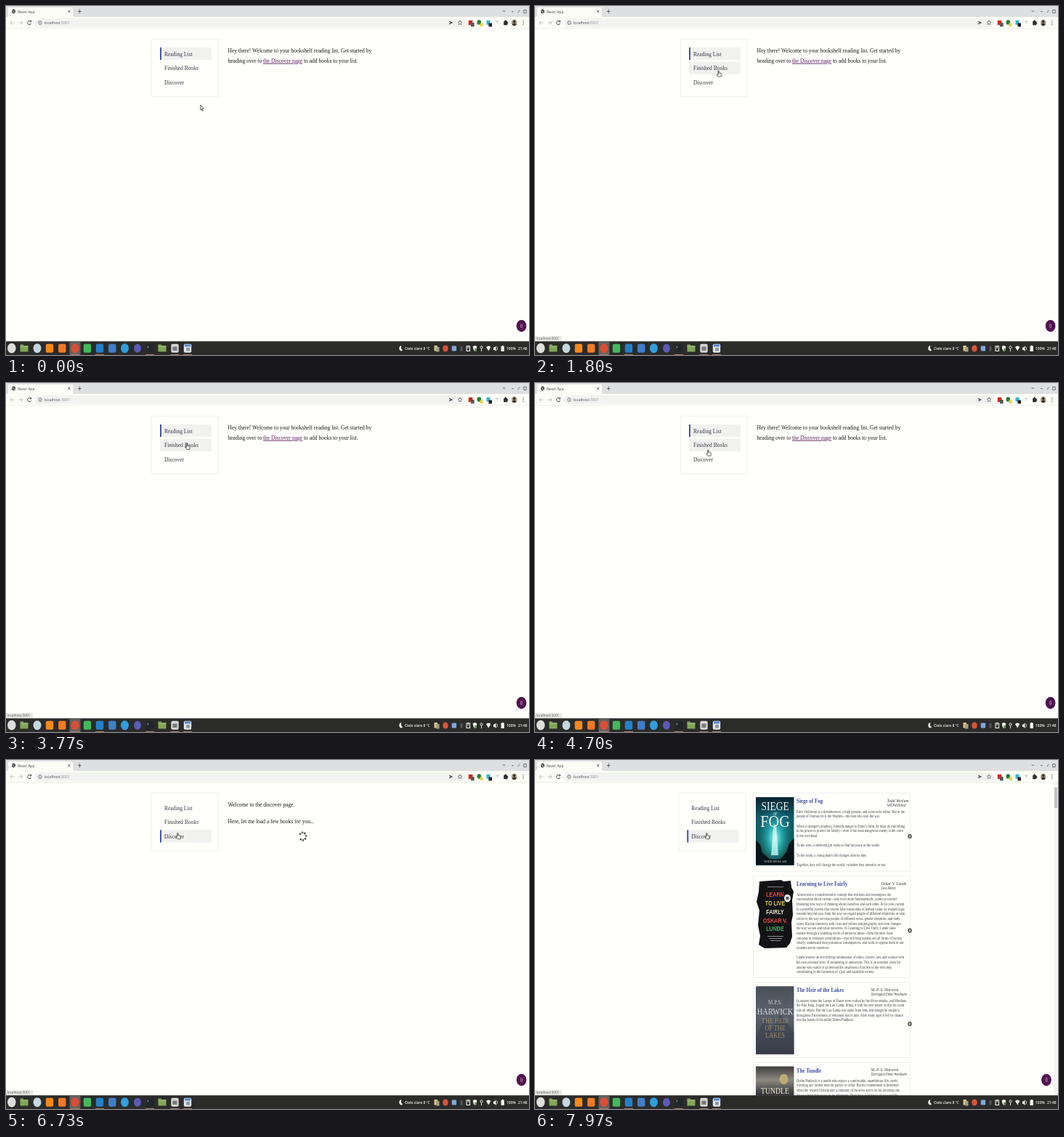
Recreate the animation shown at these times as an HTML page. Size 720x480 px, loop 8 s.

```html
<!DOCTYPE html>
<html lang="en">
<head>
<meta charset="utf-8">
<title>Bookshelf</title>
<style>
html, body { margin: 0; width: 100%; height: 100%; overflow: hidden; background: #fffffb; }
svg { display: block; width: 100vw; height: 100vh; }
text { white-space: pre; }
.ui { font-family: "Open Sans", "Noto Sans", sans-serif; }
.serif { font-family: "Liberation Serif", serif; }
.cursor { animation: point 8s linear infinite; }
.spin { animation: spin 1s linear -.605s infinite; }
.slide { animation: slide 8s step-end infinite; }
.badge { animation: badge 8s step-end infinite; }
@keyframes point {
  0%, 6.5% { transform: translate(267.8px, 136px); }
  11.9%, 18% { transform: translate(260.5px, 103.5px); }
  24% { transform: translate(250px, 84px); }
  34.6%, 54% { transform: translate(249.2px, 83px); }
  58.75% { transform: translate(238.3px, 91.8px); }
  62%, 100% { transform: translate(236.3px, 100.3px); }
}
@keyframes spin { to { transform: rotate(360deg); } }
@keyframes slide { 0% { transform: none; } 88%, 100% { transform: translateX(-2.7px); } }
@keyframes badge { 0% { transform: none; } 88%, 100% { transform: translateX(-5.6px); } }
</style>
</head>
<body>
<svg id="stage" viewBox="0 0 720 480" preserveAspectRatio="none"></svg>
<script>
const LOOP = 8000, HOVER = 872, FINISHED = 1650, DISCOVER = 4800, CLICK = 5400, LOADED = 7050;
const PAGE = '#fffffb', INK = '#343a40', INDIGO = '#3f4ea8', GLOW = '#f1f1f0', BORDER = '#ececee';
const sheet = document.head.appendChild(document.createElement('style'));
let rules = 0;

// The desktop is 1920 x 1080, squeezed onto the 720 x 480 stage.
const SQUEEZE = 'scale(.375 .4444)';
const text = (x, y, size, str, fill, more = '') =>
  `<text transform="translate(${x} ${y}) ${SQUEEZE}" font-size="${size}" fill="${fill}" ${more}>${str}</text>`;
const rect = (x, y, w, h, fill, more = '') =>
  `<rect x="${x}" y="${y}" width="${w}" height="${h}" fill="${fill}" ${more}/>`;
const dot = (x, y, r, fill, more = '') =>
  `<ellipse cx="${x}" cy="${y}" rx="${r}" ry="${r * 1.185}" fill="${fill}" ${more}/>`;
const line = (d, stroke, width = .9, more = '') =>
  `<path d="${d}" fill="none" stroke="${stroke}" stroke-width="${width}" ${more}/>`;
const frame = (x, y, w, h) => rect(x, y, w, h, 'none', `stroke="${BORDER}" stroke-width=".8"`);

// Shows the content only inside the given [from, to] spans, in ms.
function during(spans, content) {
  const name = 'show' + rules++;
  const steps = spans.map(([a, b]) =>
    `${a / LOOP * 100}%{visibility:visible}` + (b < LOOP ? `${b / LOOP * 100}%{visibility:hidden}` : ''));
  const start = spans[0][0] ? '0%{visibility:hidden}' : '';
  sheet.textContent += `@keyframes ${name}{${start}${steps.join('')}}`;
  return `<g style="animation:${name} ${LOOP}ms step-end infinite">${content}</g>`;
}

function browserBar() {
  const ink = '#45474a', pale = '#bcbec0';
  return `<g class="ui">` +
    rect(0, 0, 720, 15, '#dedfe0') +
    `<path d="M1 15q2 0 2-3V4q0-2 2-2H90q2 0 2 2v8q0 3 2 3z" fill="#fdfdf8"/>` +
    rect(0, 15, 720, 16, '#fdfdf8') + rect(0, 30.6, 720, .6, '#e4e4e2') +
    rect(40, 17.2, 592, 12, '#f2f3f0', 'rx="5"') +
    dot(10.5, 7.5, 2.5, '#505356') + line('M8.5 6.5l2 1 1.5 2.5', '#e4e6e8', .7) +
    text(16, 10, 13.4, 'React App', ink) +
    line('M85.3 5.7l3 3.6m0-3.6l-3 3.6M99 7.5h4.6m-2.3-2.7v5.4', ink, .8) +
    line('M11.5 23h-5.5m2.3-2.7L6 23l2.3 2.7M17.3 23h5.5m-2.3-2.7l2.3 2.7-2.3 2.7', pale) +
    line('M34 21.2a2.4 2.8 0 1 0 .4 2.8M34.6 19.8v2.2h-2', ink, 1) +
    dot(47, 23, 2.2, 'none', `stroke="${ink}" stroke-width=".6"`) + line('M47 22.5v2M47 21.2v.6', ink, .6) +
    text(53, 25.2, 13.7, `localhost<tspan fill="#85888c">:3001</tspan>`, ink) +
    line('M683.8 6l1.7 2 1.7-2M696 7.7h2.8M704.8 9.2l2.5-3.5M712.8 5.4h3.4v4.2h-3.4z', ink, .7) +
    `<path d="M610 20.5l5.2 2.5-5.2 2.5.6-2 2.2-.5-2.2-.5z" fill="${ink}"/>` +
    `<path d="M625 19.8l.8 2.2h2l-1.6 1.5.6 2.4-1.8-1.4-1.8 1.4.6-2.4-1.6-1.5h2z" fill="none" stroke="${ink}" stroke-width=".6"/>` +
    rect(636.8, 19.8, 5.6, 6.4, '#d0281e') + rect(640, 23, 4.6, 5.4, '#55585a') +
    dot(651.3, 22.5, 2.8, '#2c7a38') + rect(652.5, 23.5, 4, 4.5, '#e2d43c') +
    rect(661.5, 19.7, 5, 6, '#3ab4d4') + rect(664.5, 23.5, 4.5, 5, '#222226') +
    `<path d="M673.5 20h5.5l-2.7 5z" fill="#dcdcda"/>` +
    rect(685.2, 21, 5, 5.3, '#2c2e30') + dot(687.7, 20.6, 1.2, '#2c2e30') + dot(690.3, 23.4, 1, '#2c2e30') +
    dot(699.7, 23, 3.8, '#a89c88') + dot(699.7, 21.5, 1.7, '#3c3028') +
    `<path d="M696.7 25.5q3-4 6 0-3 3.4-6 0z" fill="#3c3028"/>` +
    [20.5, 23, 25.5].map(y => dot(712, y, .6, ink)).join('') + `</g>`;
}

function taskbar() {
  const folder = x => `<path d="M${x - 5.5} 465.5h4l1 1.5h6v8.5h-11z" fill="#82a659"/>` +
    rect(x - 5.5, 468.5, 11, .6, '#b3cc8c');
  const tile = (x, fill) => rect(x - 5.2, 464.7, 10.4, 12, fill, 'rx="2"');
  const tray = '#f2f2f0';
  return `<g class="ui">` + rect(0, 461.3, 720, 18.7, '#2b2b2a') + rect(0, 461.3, 720, .6, '#474746') +
    rect(87.5, 462, 15, 18, '#62625f') +
    dot(7.8, 470.7, 5.8, '#dededc') + folder(25) + dot(43, 470.7, 5.5, '#c4d8e0') +
    tile(60, '#f58a1c') + tile(77.3, '#f07a26') + dot(95, 470.7, 5.5, '#dc4e36') +
    tile(112, '#43b95c') + tile(129, '#2580c8') + tile(146.3, '#3f7fc8') +
    dot(163.5, 470.7, 5.5, '#2f9fdc') + dot(181, 470.7, 5, '#5a5cb6') +
    rect(192.5, 465, 11, 11.5, '#20262a') + line('M194.5 467.5l1.6 1.5-1.6 1.5', tray, .6) +
    folder(215) + tile(232.5, '#d6d6d4') + rect(229.5, 468.5, 6, 5.5, '#7a7a7c') +
    tile(250, '#e4e6e8') + rect(246, 465.5, 8, 3, '#4a86d8') + rect(248, 470, 5, 4.5, '#8a9aa8') +
    [95, 129, 198, 232.5, 250].map(x => rect(x - 6, 479, 12, 1, '#a8806c')).join('') +
    `<path d="M544.5 467.3a2.8 3.6 0 1 0 1.6 6 3.4 4 0 0 1-1.6-6z" fill="${tray}"/>` +
    text(549, 473.3, 12.9, 'Cielo claro 8 °C', tray, 'font-weight="600"') +
    rect(589.5, 467, 4.5, 7.5, '#d6c488') + rect(592, 469, 4.5, 6.5, '#a8a080') +
    dot(605, 471, 3.8, '#d8543a') + rect(613.7, 467.5, 6.4, 7, '#7ea8dc', 'rx="1"') +
    rect(625.5, 468, 3, 6.5, '#555556') + line('M634 468h4.5v6.5h-4.5zM636.2 466.8v4', tray, 1.1) +
    `<path d="M642.8 468l2.7-1 2.7 1q0 5-2.7 7-2.7-2-2.7-7z" fill="${tray}"/>` + rect(645, 471, 3, 3.5, '#6d9a5c') +
    dot(654.5, 469.5, 1.5, 'none', `stroke="${tray}"`) + line('M654.5 471.5v3.7', tray) +
    `<path d="M661 469q3.2-3 6.4 0l-3.2 5.5z" fill="${tray}"/>` +
    `<path d="M671 469.5h1.5l2-2v7.4l-2-2H671z" fill="${tray}"/>` + line('M675.7 468.5q2 2.5 0 5.2', tray, .8) +
    rect(681.5, 467.7, 4.4, 7.3, tray) + rect(682.7, 466.8, 2, 1, tray) +
    text(689, 473.3, 13.2, '100%', tray, 'font-weight="600"') +
    text(705, 473.3, 13.2, '21:48', tray, 'font-weight="600"') + `</g>`;
}

function menu() {
  const row = n => 57 + n * 19.6;
  const glow = n => rect(212, row(n), 71, 17.2, GLOW);
  const bar = n => rect(212, row(n), 1.9, 17.2, INDIGO);
  return `<g class="slide serif">` + frame(200.7, 45.3, 92, 79.5) +
    during([[0, CLICK]], glow(0) + bar(0)) +
    during([[FINISHED, DISCOVER]], glow(1)) +
    during([[HOVER, FINISHED], [DISCOVER, LOOP]], glow(2)) +
    during([[CLICK, LOOP]], bar(2)) +
    ['Reading List', 'Finished Books', 'Discover'].map((s, n) => text(218, row(n) + 11.7, 20, s, INK)).join('') +
    `</g>`;
}

function spinner() {
  const dots = [0, 1, 2, 3, 4, 5, 6].map(i => {
    const a = i * Math.PI / 4;
    return `<circle cx="${12 * Math.cos(a)}" cy="${12 * Math.sin(a)}" r="2.9"/>`;
  }).join('');
  return `<g transform="translate(408.5 105) ${SQUEEZE} rotate(-262.8)"><g class="spin" fill="#18181a">${dots}</g></g>`;
}

function pages() {
  const ink = '#18181a';
  const hello = text(305.5, 64.4, 20, 'Hey there! Welcome to your bookshelf reading list. Get started by', ink) +
    text(305.5, 77.7, 20, 'heading over to <tspan fill="#5f1f62" text-decoration="underline">the Discover page</tspan> to add books to your list.', ink);
  const loading = text(305.5, 64.4, 20, 'Welcome to the discover page.', ink) +
    text(305.5, 86.6, 20, 'Here, let me load a few books for you...', ink) + spinner();
  return `<g class="serif">` + during([[0, CLICK]], hello) + during([[CLICK, LOADED]], loading) +
    during([[LOADED, LOOP]], books()) + `</g>`;
}

const middle = (y, size, str, fill, x = 330.5) => text(x, y, size, str, fill, 'text-anchor="middle"');

const covers = [
  y => rect(304, y, 52.5, 93.5, 'url(#night)') + rect(304, y, 52.5, 93.5, 'url(#flare)') +
    `<path d="M304 ${y + 93.5}v-34l6 6 3 11 10 9h15l8-10 4-12 6.5-7v37z" fill="#061418"/>` +
    `<path d="M328.5 ${y + 38}h3.5l3 42h-10z" fill="#d0fff6" opacity=".75"/>` +
    middle(y + 18, 36, 'SIEGE', '#f4f6f4') + middle(y + 25, 13, 'OF', '#f4f6f4') +
    middle(y + 41, 54, 'FOG', '#f4f6f4') + middle(y + 89.5, 11, 'TODD WEXLAM', '#d8e8e4'),
  y => `<path d="M309 ${y + 2}l30-2 3 2 10-1 1 9 3 6-2 12 1 20-2 10 1 20-3 9-5 6-30 1-8-5 2-12-3-15 2-20-4-12 3-14z" fill="#131316"/>` +
    `<g font-family="Liberation Sans Narrow, Liberation Sans, sans-serif" font-weight="700">` +
    [['LEARN', '#e04a3c'], ['TO LIVE', '#ded048'], ['FAIRLY', '#ece8c8'], ['OSKAR V.', '#e04a3c'], ['LUNDE', '#48ac5c']]
      .map(([s, c], i) => middle(y + 23 + i * 11.8, 19, s, c)).join('') + `</g>` +
    dot(347.5, y + 25, 4.5, '#e8e8e6') + rect(345.5, y + 23, 4, 4, '#5c5c5e') +
    rect(320, y + 9, 22, .8, '#a0a0a0') + rect(320, y + 77, 22, .8, '#a8a8a8') +
    rect(322, y + 80, 18, .8, '#a8a8a8') + rect(324, y + 83, 14, .8, '#a8a8a8'),
  y => rect(304, y, 52.5, 93.5, 'url(#dusk)') +
    `<path d="M304 ${y + 70}l12-25 9 14 13-20 18.5 24v30.5H304z" fill="#3c4250" opacity=".6"/>` +
    middle(y + 25, 19, 'M.P.S.', '#ccd0d4') + middle(y + 38.5, 28, 'HARWICK', '#d8dcdc') +
    ['THE HEIR', 'OF THE', 'LAKES'].map((s, i) => middle(y + 51 + i * 10, 22, s, '#9c9068')).join(''),
  y => rect(304, y, 52.5, 93.5, 'url(#slate)') + dot(342.5, y + 17.5, 6, '#c0ac78') +
    middle(y + 38, 26, 'TUNDLE', '#ecead4')
];

const shelf = [
  { top: 45.3, height: 107.7, plus: 105, title: 'Siege of Fog', by: 'Todd Wexlam', press: 'Self Published', x: 484.5,
    about: `Edric Hollowan is a threadweaver, a high general, and soon-to-be father. But to the
people of Ostmar, he is the Warden—the man who won the war.

When a stranger's prophecy foretells danger to Edric's child, he must do everything
in his power to protect his family—even if the most dangerous enemy is the voice
in his own head.

To the west, a sheltered girl seeks to find her place in the world.

To the south, a young man's life changes after he dies.

Together, they will change the world—whether they intend to or not.` },
  { top: 159.3, height: 140, plus: 234.5, title: 'Learning to Live Fairly', by: 'Oskar V. Lunde', press: 'Low Abbey', x: 476.5,
    about: `Antiracism is a transformative concept that reorients and reenergizes the
conversation about racism—and, even more fundamentally, points us toward
liberating new ways of thinking about ourselves and each other. At its core, racism
is a powerful system that creates false hierarchies of human value; its warped logic
extends beyond race, from the way we regard people of different ethnicities or skin
colors to the way we treat people of different sexes, gender identities, and body
types. Racism intersects with class and culture and geography and even changes
the way we see and value ourselves. In Learning to Live Fairly, Lunde takes
readers through a widening circle of antiracist ideas—from the most basic
concepts to visionary possibilities—that will help readers see all forms of racism
clearly, understand their poisonous consequences, and work to oppose them in our
systems and in ourselves.

Lunde weaves an electrifying combination of ethics, history, law, and science with
his own personal story of awakening to antiracism. This is an essential work for
anyone who wants to go beyond the awareness of racism to the next step:
contributing to the formation of a just and equitable society.` },
  { top: 305.4, height: 104, plus: 363, title: 'The Heir of the Lakes', by: 'M. P. S. Harwick', press: 'Tarrington Ebbel Westholm', x: 462.5,
    about: `In ancient times the Lamps of Dawn were crafted by the River-smiths, and Mordane,
the Pale King, forged the Last Lamp, filling it with his own power so that he could
rule all others. But the Last Lamp was taken from him, and though he sought it
throughout Farrowmere, it remained lost to him. After many ages it fell by chance
into the hands of the miller Dobin Puddock.` },
  { top: 415.6, height: 104, plus: 473, title: 'The Tundle', by: 'M. P. S. Harwick', press: 'Tarrington Ebbel Westholm', x: 462.5,
    about: `Dobin Puddock is a tundle who enjoys a comfortable, unambitious life, rarely
traveling any farther than his pantry or cellar. But his contentment is disturbed
when the wizard Ostrand and a company of dwarves arrive on his doorstep one
day to whisk him away on an adventure. They have launched a plot to raid the` }
];

function books() {
  const cards = shelf.map((b, i) => {
    const y = b.top;
    const lines = b.about.split('\n').map((s, n) => text(360, y + 27.2 + n * 6.667, 12, s, '#44484e')).join('');
    return frame(300.5, y, 216, b.height) + covers[i](y + 5.8) +
      text(360, y + 14, 18.72, b.title, INDIGO, 'font-weight="700"') +
      text(b.x, y + 12.3, 15, b.by, INK, 'font-style="italic"') +
      text(b.x, y + 18.8, 12, b.press, INK, 'font-style="italic"') + lines +
      dot(516, b.plus, 2, '#fafaf2', 'stroke="#38382c" stroke-width="1.3"') +
      rect(515.5, b.plus - .6, 1, 1.2, '#38382c');
  });
  return cards.join('') + rect(714.3, 31.3, 5.7, 430, '#f4f4f0') + rect(715, 38, 4.2, 28, '#c2c2c0');
}

function pointer() {
  const outline = 'fill="#fffffb" stroke="#2a2a2a" stroke-width=".8" stroke-linejoin="round"';
  const arrow = `<path d="M0 0v7.2l1.4-1.5 1.1 2.6 1-.5-1.1-2.4h1.8z" ${outline}/>`;
  const hand = `<path d="M-.6.4q.6-.8 1.2 0v2.8l3 .7q.6.2.5 1l-.5 3.4h-4L-2.4 5.4q.2-1 1.8.2z" ${outline}/>`;
  return `<g class="cursor">` + during([[0, HOVER]], arrow) + during([[HOVER, LOOP]], hand) + `</g>`;
}

const stops = list => list.map(([at, c, o = 1]) => `<stop offset="${at}" stop-color="${c}" stop-opacity="${o}"/>`).join('');
const fade = (id, list) => `<linearGradient id="${id}" x2="0" y2="1">${stops(list)}</linearGradient>`;

document.getElementById('stage').innerHTML = `<defs>` +
  fade('night', [[0, '#082430'], [.3, '#125a68'], [.6, '#0f5c5c'], [.8, '#12483c'], [1, '#050c0e']]) +
  fade('dusk', [[0, '#4a5058'], [.4, '#5c636e'], [.7, '#4a5058'], [1, '#34383e']]) +
  fade('slate', [[0, '#3c3c3a'], [.2, '#8c8a80'], [.4, '#38383a'], [1, '#2a2a2a']]) +
  `<radialGradient id="flare" cy=".6" r=".5">${stops([[0, '#c8fff4', .95], [.35, '#30c8d0', .75], [1, '#127080', 0]])}</radialGradient></defs>` +
  rect(0, 0, 720, 480, PAGE) + pages() + menu() +
  `<g class="badge serif">` + dot(709.6, 440, 6.9, '#501450') + middle(442.6, 17, '0', '#e4c8e0', 709.6) + `</g>` +
  during([[HOVER, LOOP]], `<g class="ui">` + rect(0, 454, 37, 7.5, '#e8e8e4') + text(1.5, 459.4, 12.6, 'localhost:3001', '#5c5f62') + `</g>`) +
  browserBar() + taskbar() + pointer();
</script>
</body>
</html>
```
